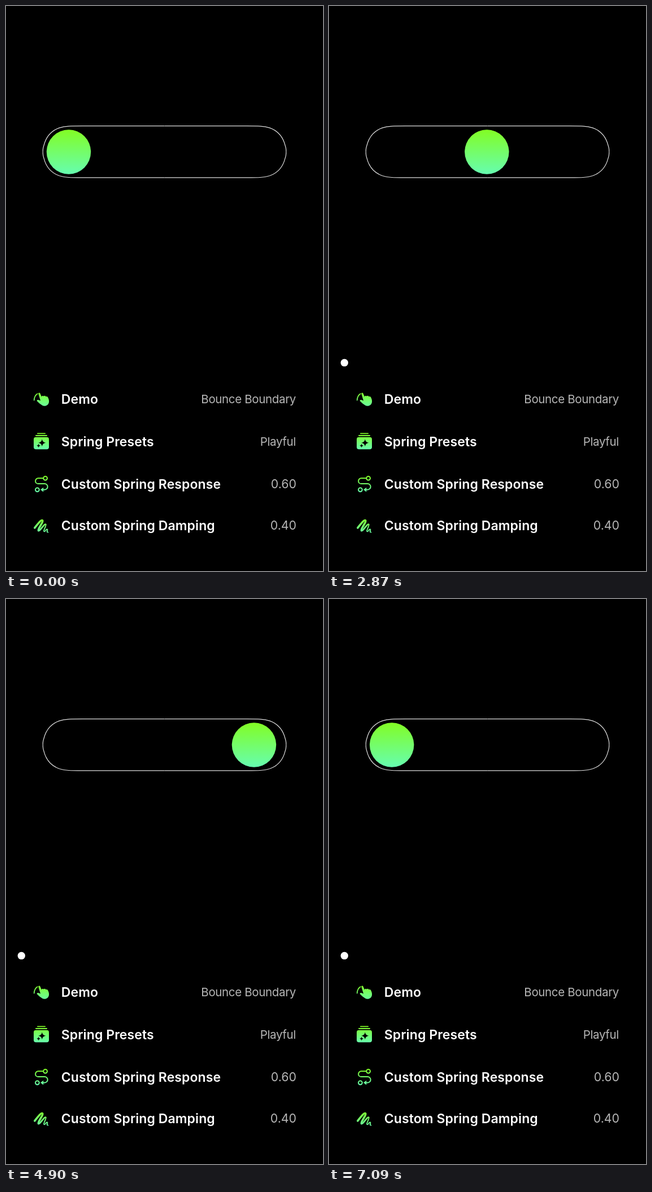
These frames come from a looping animation (561 px wide and 997 px high, 7200 ms). An HTML page:

```html
<!DOCTYPE html>
<html lang="en">
<head>
<meta charset="utf-8">
<title>Bounce Boundary</title>
<style>
  html, body { margin: 0; width: 100%; height: 100%; overflow: hidden; background: #000; }
  svg { display: block; width: 100%; height: 100%; }
  text { font-family: Inter, Roboto, sans-serif; }
  .label { font-size: 23px; font-weight: 600; letter-spacing: .08px; fill: #fff; }
  .value { font-size: 20.5px; letter-spacing: -.35px; fill: #b6b6b6; text-anchor: end; }
  .number { font-size: 21.3px; letter-spacing: 0; }
  .fill { fill: url(#iconPaint); }
  .line { fill: none; stroke: url(#iconPaint); stroke-width: 2; stroke-linecap: round; stroke-linejoin: round; }
</style>
</head>
<body>
<svg viewBox="0 0 561 997">
  <defs>
    <linearGradient id="ballPaint" x1="0" y1="0" x2="0" y2="1">
      <stop stop-color="#82fd24"/><stop offset="1" stop-color="#66fdb0"/>
    </linearGradient>
    <linearGradient id="iconPaint" gradientUnits="userSpaceOnUse" x1="0" y1="1" x2="0" y2="30">
      <stop stop-color="#82fd24"/><stop offset="1" stop-color="#66fdb0"/>
    </linearGradient>
    <path id="quarterTrack" fill="none" stroke="#ddd" stroke-width="1.2"
      d="M280.5 211.7H135C114.9 211.7 104.9 211.7 94.1 215.1C82.3 219.4 73 228.7 68.7 240.5C65.3 251.3 65.3 251.3 65.3 257.3"/>
    <g id="halfTrack">
      <use href="#quarterTrack"/>
      <use href="#quarterTrack" transform="translate(0 514.6) scale(1 -1)"/>
    </g>
  </defs>
  <rect width="561" height="997"/>

  <use href="#halfTrack"/>
  <use href="#halfTrack" transform="translate(561 0) scale(-1 1)"/>
  <circle id="ball" cx="111" cy="257.5" r="39.2" fill="url(#ballPaint)"/>
  <circle id="dot" cx="27.3" cy="629.4" r="6.7" fill="#fff" opacity="0"/>

  <g transform="translate(48 680)">
    <path class="line" style="stroke-width:1.7" d="M1.7 15.6C2 9.8 4.3 6.3 7.6 4.2"/>
    <path class="fill" d="M9.3 4.2C8.7 2.4 11.6 1.6 12.4 3.4L15 9.6C15.4 7.6 17.8 7 18.8 8.8C19.6 7.4 22 7.5 22.6 9.5C24 8.4 25.8 9.2 26.4 11C28.6 15.5 28.8 20 26.3 23C23.8 26 19 26.8 15.8 24.6C12.5 22.4 9 19 7.2 17.4C5.8 16 7.5 14.4 9.2 15.1L13 16.6Z"/>
  </g>
  <g transform="translate(48 753)">
    <rect class="fill" x="7" y=".6" width="15" height="1.7" rx=".8"/>
    <rect class="fill" x="4" y="4" width="21" height="2" rx="1"/>
    <rect class="fill" x="1" y="7.8" width="27" height="21.4" rx="4"/>
    <path d="M15.8 11.2Q16.6 16.9 22.3 17.7Q16.6 18.5 15.8 24.2Q15 18.5 9.3 17.7Q15 16.9 15.8 11.2Z"/>
    <path d="M9.6 19.2Q10.1 22.3 13.2 22.8Q10.1 23.3 9.6 26.4Q9.1 23.3 6 22.8Q9.1 22.3 9.6 19.2Z"/>
  </g>
  <g transform="translate(48 828)">
    <circle class="line" cx="21.6" cy="5.3" r="3.4"/>
    <circle class="line" cx="7.4" cy="25.6" r="3.4"/>
    <path class="line" d="M18 5.3H9a4.9 4.9 0 0 0 0 9.8H20.5a5.1 5.1 0 0 1 0 10.3H17"/>
    <path class="fill" d="M13 25.5L18.2 21.6V29.4Z"/>
  </g>
  <g transform="translate(48 902)">
    <path class="line" style="stroke-width:3.6" d="M2.8 18.8C8 12.5 14 4 16.4 5.8C19 7.8 7.6 21 9.4 23.6"/>
    <path class="line" style="stroke-width:2.8" d="M9.4 23.6C11.4 26 19.8 11 22.2 12.8"/>
    <path class="line" style="stroke-width:1.9" d="M22.2 12.8C24.4 14.6 17.2 23.6 19.4 25.2C21.4 26.4 22.6 20.6 24.8 21.4C27 22.4 22.4 26.8 26.4 26.6"/>
  </g>

  <text class="label" x="97.8" y="702">Demo</text>
  <text class="label" x="97.8" y="777">Spring Presets</text>
  <text class="label" x="97.8" y="852">Custom Spring Response</text>
  <text class="label" x="97.8" y="925">Custom Spring Damping</text>
  <text class="value" x="513" y="701.3">Bounce Boundary</text>
  <text class="value" x="513" y="776.3">Playful</text>
  <text class="value number" x="514" y="851.3">0.60</text>
  <text class="value number" x="514" y="924.3">0.40</text>
</svg>
<script>
  const LOOP = 7200;
  const LEFT = 111, RIGHT = 450;
  const TAPS = [1391, 2659, 4012, 5503];
  const DOT_START = 1290, DOT_FADE = 80;
  const PRESS = 150;
  const OMEGA = 2 * Math.PI, ZETA = 0.55;
  const DAMPED = OMEGA * Math.sqrt(1 - ZETA * ZETA);

  const ball = document.getElementById('ball');
  const dot = document.getElementById('dot');

  // Remaining distance of a damped spring, folded back at the wall.
  function bounce(sec) {
    const a = DAMPED * sec, k = ZETA * OMEGA / DAMPED;
    return Math.abs(Math.exp(-k * a) * (Math.cos(a) + k * Math.sin(a)));
  }

  function ballX(t) {
    const n = TAPS.filter(tap => tap <= t).length;
    if (!n) return LEFT;
    const [from, to] = n % 2 ? [LEFT, RIGHT] : [RIGHT, LEFT];
    return to + (from - to) * bounce((t - TAPS[n - 1]) / 1000);
  }

  function dotScale(t) {
    const near = Math.min(...TAPS.map(tap => Math.abs(t - tap)));
    return near < PRESS ? 1 - 0.075 * (1 + Math.cos(Math.PI * near / PRESS)) : 1;
  }

  function draw(t) {
    ball.setAttribute('cx', ballX(t).toFixed(2));
    dot.setAttribute('r', (6.7 * dotScale(t)).toFixed(2));
    dot.setAttribute('opacity', Math.max(0, Math.min(1, (t - DOT_START) / DOT_FADE)));
  }

  const start = performance.now();
  function tick() {
    draw((performance.now() - start) % LOOP);
    requestAnimationFrame(tick);
  }
  tick();
</script>
</body>
</html>
```
